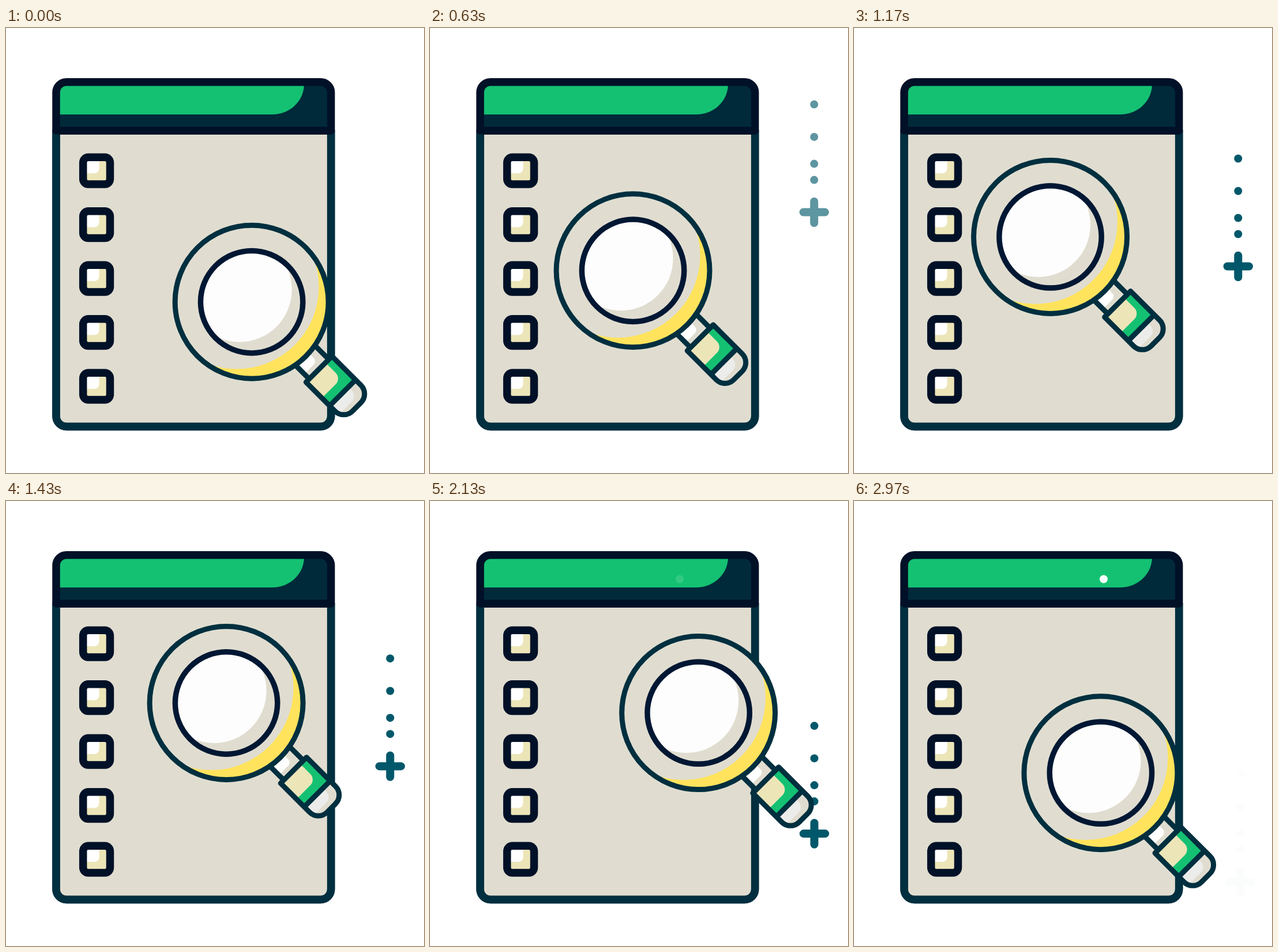
Animation of 725x772 px, one loop 3 s. Source, as an HTML page:

```html
<!DOCTYPE html>
<html lang="en">
<head>
<meta charset="utf-8">
<title>Checklist search</title>
<style>
  html, body { margin: 0; width: 100%; height: 100%; overflow: hidden; background: #fff; }
  svg { display: block; width: 725px; height: 772px; }
  .line { fill: none; stroke: #002f3f; stroke-width: 9; stroke-linejoin: round; }
  .frame { stroke-width: 13.5; }
  .dark { stroke: #001127; }
  .shade { fill: #e0ddd0; }
  .paper { fill: #fcfcfc; }
  .cream { fill: #ece5b8; }
  .green { fill: #14c172; }
</style>
</head>
<body>
<svg viewBox="0 0 725 772">
  <defs>
    <clipPath id="ring"><circle r="133"/></clipPath>
    <clipPath id="glass"><circle r="88.5"/></clipPath>
    <path id="grip" d="M165-31.8H236A21.5 21.5 0 0 1 257.5-10.3V10.3A21.5 21.5 0 0 1 236 31.8H165Z"/>
    <clipPath id="gripClip"><use href="#grip"/></clipPath>
    <g id="box">
      <rect class="cream" x="135" y="225.5" width="44" height="44" fill="#e8e1c0"/>
      <path fill="#fff" d="M140 230H161.5V244A8 8 0 0 1 153.500 252H140Z"/>
      <rect class="line frame dark" x="133.700" y="224.300" width="46.800" height="46.800" rx="9"/>
    </g>
  </defs>

  <!-- sheet -->
  <path id="sheet" class="shade" d="M87 178H563.700V673.500A18 18 0 0 1 545.700 691.500H105A18 18 0 0 1 87 673.500Z"/>
  <path class="paper" d="M90 178H480V608A37 37 0 0 1 443 645H90Z"/>
  <use href="#sheet" class="line frame" style="fill:none"/>
  <path class="line frame" d="M87 178H563.700V673.500A18 18 0 0 1 545.700 691.500H105A18 18 0 0 1 87 673.500Z"/>

  <!-- header -->
  <path fill="#002a3a" d="M87 178V112A18 18 0 0 1 105 93.700H545.700A18 18 0 0 1 563.700 112V178Z"/>
  <path class="green" d="M90 97H517C517 127 492 150 462 150H90Z"/>
  <path class="line frame dark" d="M87 178V112A18 18 0 0 1 105 93.700H545.700A18 18 0 0 1 563.700 112V178Z"/>
  <circle id="blink" cx="517" cy="135.500" r="7" fill="#ff8a92" opacity="0"/>
  <circle id="lamp" cx="433" cy="135.500" r="7" fill="#fff" opacity="0"/>

  <g id="boxes"></g>

  <g id="trail" opacity="0" fill="#00586a">
    <path d="M-18.700 0H18.700M0-18.700V18.700" stroke="#00586a" stroke-width="14" stroke-linecap="round"/>
    <circle cy="-56" r="7"/><circle cy="-84" r="7"/>
    <circle cy="-130.700" r="7"/><circle cy="-187" r="7"/>
  </g>

  <!-- magnifier, origin at the lens centre -->
  <g id="lens">
    <g transform="rotate(45)">
      <path class="shade" d="M125-24H165V24H125Z"/>
      <path fill="#fff" d="M125-7H145A8 8 0 0 1 153 1V24H125Z"/>
      <path class="line" d="M125-24H165M125 24H165"/>
      <g clip-path="url(#gripClip)">
        <path class="shade" d="M160-40H265V40H160Z"/>
        <path fill="#ececea" d="M220-14H231A14 14 0 0 1 245 0V40H220Z"/>
        <path class="green" d="M160-40H223V40H160Z"/>
        <path class="cream" d="M160-16H190A14 14 0 0 1 204-2V40H160Z"/>
      </g>
      <path class="line" d="M223-31.800V31.800"/>
      <use href="#grip" class="line"/>
    </g>
    <g clip-path="url(#ring)">
      <circle r="133" fill="#ffe35c"/>
      <circle class="shade" cx="-26" cy="-26" r="142.400"/>
    </g>
    <circle class="line" r="133"/>
    <g clip-path="url(#glass)">
      <circle class="shade" r="89"/>
      <circle fill="#fdfdfd" cx="-21" cy="-21" r="90.500"/>
    </g>
    <circle class="line" r="88.700" style="stroke:#001733;stroke-width:9.500"/>
  </g>
</svg>
<script>
const LOOP = 3000;
const $ = id => document.getElementById(id);
const clamp = v => Math.max(0, Math.min(1, v));
const ramp = (t, a, b) => clamp((t - a) / (b - a));

// Rows are time, x, y
const lensPath = [
  [0, 426.3, 475.3], [370, 384.3, 443.3], [870, 330.3, 395.6], [1000, 326, 378],
  [1430, 382, 350.5], [2000, 455, 355.5], [2130, 465.6, 367.5],
  [2570, 448, 422.3], [2970, 428, 471.5], [3000, 426.3, 475.3]
];
const trailPath = [
  [0, 666.3, 214], [370, 666.3, 276], [870, 666.3, 359.5], [1430, 666.3, 460],
  [2090, 666.3, 573], [2130, 666.6, 577], [2570, 668.6, 621], [3000, 670.5, 664]
];

const slope = (p, i, k) => (p[i + 1][k] - p[i][k]) / (p[i + 1][0] - p[i][0]);

// Speed at a point, weighted towards its nearer neighbour
function tangent(p, i, k) {
  if (i === 0) return slope(p, 0, k);
  if (i === p.length - 1) return slope(p, i - 1, k);
  const before = p[i][0] - p[i - 1][0], after = p[i + 1][0] - p[i][0];
  return (slope(p, i - 1, k) * after + slope(p, i, k) * before) / (before + after);
}

function along(p, t, smooth) {
  let i = 0;
  while (i < p.length - 2 && t >= p[i + 1][0]) i++;
  const h = p[i + 1][0] - p[i][0], u = (t - p[i][0]) / h;
  return [1, 2].map(k => {
    const a = p[i][k], b = p[i + 1][k];
    if (!smooth) return a + (b - a) * u;
    const w = u * u * (3 - 2 * u), v = 1 - u;
    return a + (b - a) * w + h * u * v * (v * tangent(p, i, k) - u * tangent(p, i + 1, k));
  });
}

const place = (id, xy) => $(id).setAttribute('transform', `translate(${xy})`);
const fade = (id, v) => $(id).setAttribute('opacity', v);

function draw(t) {
  place('lens', along(lensPath, t, true));
  place('trail', along(trailPath, t, false));
  fade('trail', ramp(t, 0, 1000) * (1 - ramp(t, 2250, 2980)));
  fade('lamp', ramp(t, 2000, 3000));
  fade('blink', 0.25 * clamp(1 - Math.abs(t - 870) / 130));
}

for (let i = 0; i < 5; i++) {
  const box = document.createElementNS('http://www.w3.org/2000/svg', 'use');
  box.setAttribute('href', '#box');
  box.setAttribute('y', i * 93.5);
  $('boxes').append(box);
}

const start = performance.now();
function tick() {
  draw((performance.now() - start) % LOOP);
  requestAnimationFrame(tick);
}
draw(0);
requestAnimationFrame(tick);
</script>
</body>
</html>
```
